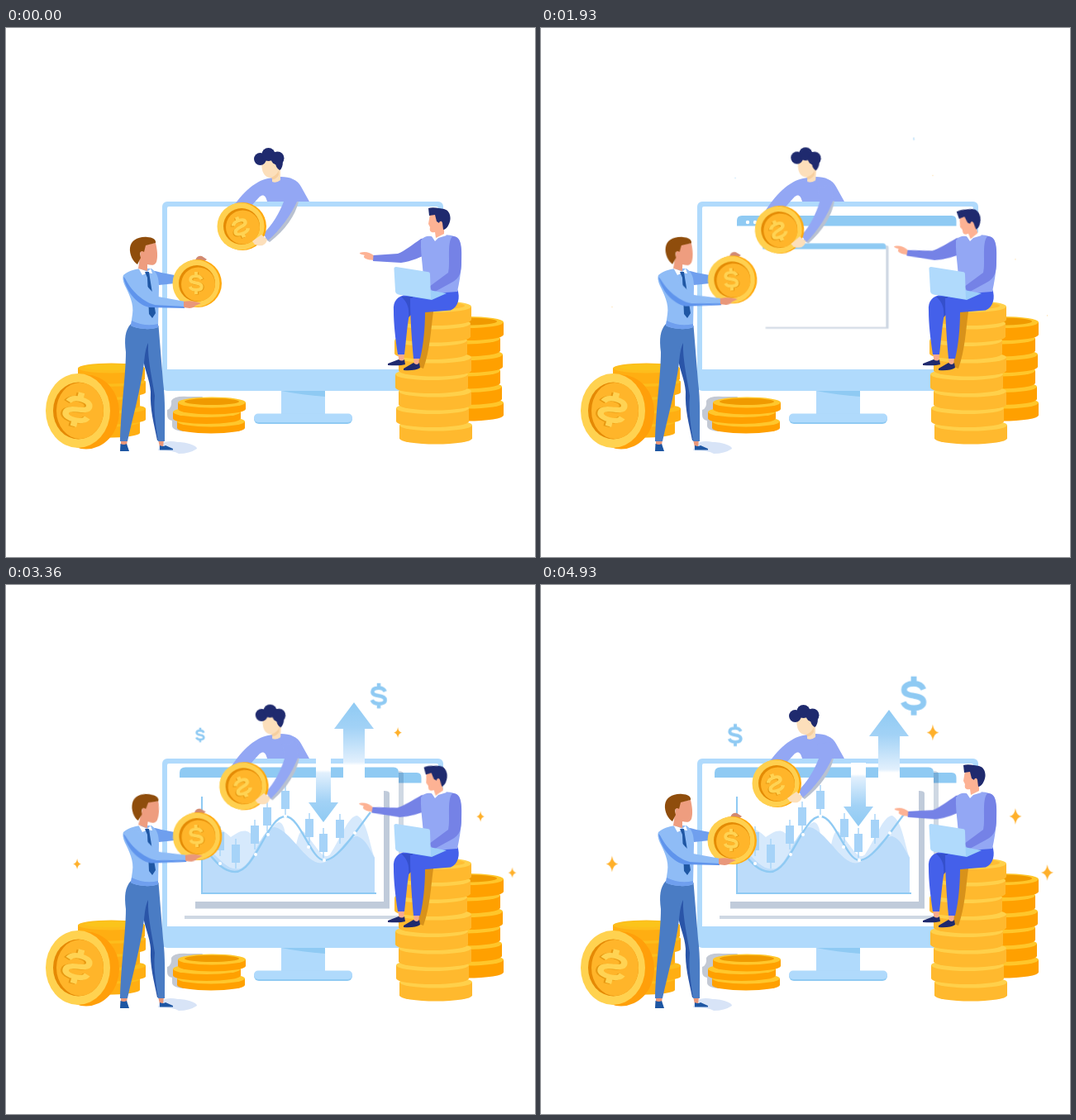
These frames come from a looping animation (640 px wide and 640 px high, 5000 ms). An HTML page:

```html
<!DOCTYPE html>
<html lang="en">
<head>
<meta charset="utf-8">
<title>Investment scene</title>
<style>
html, body { margin: 0; width: 100%; height: 100%; overflow: hidden; background: #fff; }
svg { display: block; width: 100vw; height: 100vh; }
.a { animation: 5s linear infinite; }
.pulse { animation-name: pulse; }
.nod { animation-name: nod; transform-origin: 168px 292px; }
.lift { animation-name: lift; transform-origin: 150px 300px; }
.tilt { animation-name: tilt; transform-origin: 327px 186px; }
.swing { animation-name: swing; transform-origin: 345px 195px; }
.look { animation-name: look; transform-origin: 523px 249px; }
.point { animation-name: point; transform-origin: 510px 262px; }
.win1 { animation-name: win1; transform-origin: 323px 305px; }
.win2 { animation-name: win2; transform-origin: 343px 312px; }
.win3 { animation-name: win3; transform-origin: 343px 318px; }
.up { animation-name: up; transform-origin: 421px 240px; }
.down { animation-name: down; transform-origin: 384px 210px; }
@keyframes pulse {
  0%, 40%, 80% { transform: scale(0); }
  20%, 60%, 99%, 100% { transform: scale(1); }
}
@keyframes nod {
  0%, 48.6%, 98.6%, 100% { transform: rotate(0deg); }
  20% { transform: rotate(8deg); }
  30%, 58.6% { transform: rotate(3deg); }
  75.8% { transform: rotate(9deg); }
}
@keyframes lift {
  0%, 48.6%, 98.6%, 100% { transform: rotate(0deg); }
  20% { transform: rotate(-2.2deg); }
  30%, 75.8% { transform: rotate(-6deg); }
  58.6% { transform: rotate(-1deg); }
}
@keyframes tilt {
  0%, 98.6%, 100% { transform: rotate(0deg); }
  20% { transform: rotate(2deg); }
  30%, 75.8% { transform: rotate(6deg); }
  48.6% { transform: rotate(3deg); }
  58.6% { transform: rotate(1deg); }
}
@keyframes swing {
  0%, 98.6%, 100% { transform: rotate(0deg); }
  20% { transform: rotate(-1.9deg); }
  30%, 75.8% { transform: rotate(-4.9deg); }
  48.6% { transform: rotate(-2.9deg); }
  58.6% { transform: rotate(-1.5deg); }
}
@keyframes look {
  0%, 28%, 73%, 100% { transform: rotate(0deg); }
  30% { transform: rotate(-2deg); }
  41%, 62% { transform: translate(-2px, 1px) rotate(-16deg); }
}
@keyframes point {
  0%, 100% { transform: rotate(0deg); }
  20%, 75.8% { transform: rotate(7deg); }
  30% { transform: rotate(9deg); }
  48.6% { transform: rotate(1.5deg); }
  58.6% { transform: rotate(4deg); }
  98.6% { transform: rotate(1deg); }
}
@keyframes win1 { 0%, 18% { transform: scale(0); } 28%, 100% { transform: scale(1); } }
@keyframes win2 { 0%, 33% { transform: scale(0); } 43%, 100% { transform: scale(1); } }
@keyframes win3 { 0%, 48.7% { transform: scale(0); } 58%, 100% { transform: scale(1); } }
@keyframes up {
  0%, 57.6% { transform: scaleY(0); }
  68%, 75.8% { transform: translateY(0) scaleY(1); }
  98.6%, 100% { transform: translateY(9px) scaleY(1); }
}
@keyframes down {
  0%, 57.6% { transform: scaleY(0); }
  68%, 75.8% { transform: translateY(0) scaleY(1); }
  98.6%, 100% { transform: translateY(5px) scaleY(1); }
}
</style>
</head>
<body>
<svg viewBox="0 0 640 640">
<defs>
  <path id="usd" fill="none" stroke-width="7" d="M12,-8C10,-13 6,-15 0,-15C-7,-15 -12,-12.500 -12,-7.500C-12,-2 -6,-1 0,0C7,1 12,3 12,8C12,13 6,15 0,15C-6,15 -11,13 -13,8M0,-24V-15M0,15V24"/>
  <path id="star" fill="#ffb02a" d="M0,-10Q1.200,-1.200 7.500,0Q1.200,1.200 0,10Q-1.200,1.200 -7.500,0Q-1.200,-1.200 0,-10Z"/>
  <g id="gold">
    <use href="#usd" x="2" y="1" stroke="#e89a12"/>
    <use href="#usd" stroke="#ffd353"/>
  </g>
  <g id="coin">
    <circle cx="1" r="29" fill="#ffa90f"/>
    <circle cx="-1" r="28.500" fill="#ffd04f"/>
    <circle r="22" fill="#e48b05"/>
    <circle cx="1.500" cy="1" r="20.500" fill="#ffb52a"/>
  </g>
  <linearGradient id="upFill" gradientUnits="userSpaceOnUse" x1="0" y1="142" x2="0" y2="218">
    <stop stop-color="#8fcaf3"/><stop offset=".4" stop-color="#a2d2f6"/><stop offset=".95" stop-color="#e2f0fd"/><stop offset="1" stop-color="#fff"/>
  </linearGradient>
  <linearGradient id="downFill" gradientUnits="userSpaceOnUse" x1="0" y1="287" x2="0" y2="224">
    <stop stop-color="#8fcaf3"/><stop offset=".4" stop-color="#a2d2f6"/><stop offset=".95" stop-color="#e2f0fd"/><stop offset="1" stop-color="#fff"/>
  </linearGradient>
</defs>

<!-- monitor -->
<rect x="189" y="210" width="340" height="229" rx="6" fill="#b0dafc"/>
<path fill="#fff" d="M195,218Q195,216 197,216H521Q523,216 523,218V413H195Z"/>
<path fill="#b0dafc" d="M333,438H386V469H333Z"/>
<path fill="#8fcaf3" d="M333,439H386V446Q358,444 333,439Z"/>
<rect x="300" y="467" width="119" height="12" rx="6" fill="#8fcaf3"/>
<rect x="300" y="466.500" width="119" height="10.500" rx="5" fill="#b0dafc"/>

<!-- windows -->
<g class="a win1">
  <path fill="#fff" d="M237,233H502V385H237Z"/>
  <path fill="#8fcaf3" d="M237,239.500V233Q237,227 243,227H497Q502.500,227 502.500,233V239.500Z"/>
  <g fill="#fff"><circle cx="250" cy="235" r="2.200"/><circle cx="259" cy="235" r="2.200"/><circle cx="268" cy="235" r="2.200"/></g>
</g>
<g class="a win2">
  <path fill="#285082" opacity=".22" d="M216,400V404H481V229Q481,225 475,225V400Z"/>
  <path fill="#fff" d="M210,233H475V400H210Z"/>
  <path fill="#8fcaf3" d="M210,233V227Q210,220.500 217,220.500H469Q475,220.500 475,227V233Z"/>
</g>
<g class="a win3">
  <path fill="#c0cbda" d="M229,383V391.500H464V252Q464,249 457,249V383Z"/>
  <path fill="#fff" d="M223,244H457V383H223Z"/>
  <path fill="#d6e9fc" d="M238,303C252,287 262,296 272,305C282,298 292,292 300,306C310,322 319,287 331,287C341,290 338,326 344,326C353,326 351,292 361,299C377,318 384,334 392,326C406,305 414,279 425,279C437,285 440,315 446,330V373H238Z"/>
  <path fill="#bcdcfa" d="M238,318C254,320 264,348 284,343C301,335 309,293 325,293C346,297 364,341 384,336C402,330 410,304 425,304C436,308 440,320 446,330V373H238Z"/>
  <path fill="none" stroke="#8fcaf3" stroke-width="2" d="M237,256V373H448"/>
  <g id="candles" fill="#a6d3f8"></g>
  <path fill="none" stroke="#8fcaf3" stroke-width="2.300" d="M240,318C255,338 265,347 277,347C302,347 316,280 338,280C356,280 369,333 385,333C402,333 425,295 441,275"/>
  <g fill="#fff"><circle cx="259" cy="337" r="2"/><circle cx="302" cy="326" r="2"/><circle cx="317" cy="302" r="2"/><circle cx="338" cy="280" r="2"/><circle cx="366" cy="317" r="2"/><circle cx="385" cy="333" r="2"/><circle cx="422" cy="300" r="2"/></g>
</g>

<path class="a up" fill="url(#upFill)" d="M421,142L445,174H434V240H408V174H397Z"/>
<path class="a down" fill="url(#downFill)" d="M384,287L402,263H393V210H375V263H366Z"/>

<!-- coin piles -->
<path fill="#c3c9d4" d="M195,468V462Q201,460 200,451Q203,445 220,446H238L215,488Q201,487 201,481V475Q195,474 195,468Z"/>
<g id="piles"></g>
<ellipse cx="97" cy="464.500" rx="40" ry="45" fill="#ff9f0a"/>
<ellipse cx="87" cy="463" rx="39" ry="45" fill="#ffd250"/>
<ellipse cx="87.500" cy="463" rx="30.500" ry="34.500" fill="#e58905"/>
<ellipse cx="89.500" cy="463" rx="28.500" ry="34" fill="#ffb52a"/>
<use href="#gold" transform="translate(86.500 461.500) rotate(14) scale(-1.080 .87)"/>

<!-- man behind the monitor -->
<path fill="#93a7f4" d="M271,222C286,198 304,183 320,181.500C337,178 351,181 357,192L367,210H316C314,202 311,201 307,204C300,211 294,219 288,226Z"/>
<g class="a tilt">
  <path fill="#fcdfbb" d="M309,162C315,157 326,158 331,163L332,172L332,184Q327,188 322,186V181C313,182 309,175 309,162Z"/>
  <path fill="#f6cf9f" d="M321,181Q328,178 330,172L330,178Q326,184 322,183Z"/>
  <g fill="#1f2a6e"><circle cx="307.500" cy="158.500" r="7.500"/><circle cx="317.500" cy="153" r="8"/><circle cx="328.500" cy="157.500" r="8"/><path d="M325,160H335Q335,170 331,172Q326,169 325,160Z"/></g>
</g>
<g class="a swing">
  <path fill="#b9c1d0" d="M340,212L354,210C350,227 338,244 319,259L313,255Z"/>
  <path fill="#93a7f4" d="M334,192L336,210C331,223 322,239 311,249L317,257C332,244 345,226 353,208L352,190Z"/>
  <use href="#coin" x="285" y="240"/>
  <use href="#gold" transform="translate(283.500 241) rotate(-20) scale(-.64 .54)"/>
  <path fill="#fcdfbb" d="M309,250L316,256C314,263 309,265 301,262L298,258Z"/>
</g>

<!-- standing man -->
<path fill="#d8e4f7" d="M184,511C185,501 195,498 208,501C220,501 232,506 231,509Q222,515 209,515Q203,511 184,511Z"/>
<path fill="#e9977a" d="M139,498H147L146,505H139ZM184,498H191L190,507H186Z"/>
<path fill="#1d56a3" d="M138.500,503Q143,505 146,503L149,512H138ZM186,505Q190,507 193,505L202,509V510.500H186Z"/>
<path fill="#2a55a8" d="M160,378H180L184,440L186,499H183C179,478 174,462 175,440C174,425 167,412 166,400Z"/>
<path fill="#4a7cc4" d="M151,358C144,366 143,376 145,392C145,420 139,460 138,500H147C153,472 163,438 167,405C168,395 169,387 172,381C171,400 177,425 180,445C178,465 182,485 184,500H192C192,475 193,450 190,428L184.500,360Z"/>
<path fill="#6f9fee" d="M174,293Q182,294 188,296L204,299V309L185,311Z"/>
<path fill="#8fbcf6" d="M142,299C148,294 155,292 162,291H176C183,296 185,302 185,314L184,362C174,366 159,364 151,360L153,346C155,334 149,322 144,312Q140,303 142,299Z"/>
<path fill="#6f9fee" d="M151,360L152,354Q168,362 184,358V362C174,366 159,364 151,360Z"/>
<path fill="#fff" d="M160,290L171,295L175,291L177,297L171,296L165,299Z"/>
<path fill="#1f57a4" d="M168,295H173L174,302L181,345L177,351L173,346L171,302Z"/>
<g class="a nod">
  <path fill="#ee9d7f" d="M165,263L181,260C183,268 184,277 182,283C180,288 175,287 171,286V294L160,291L163,270Z"/>
  <path fill="#8f4d0c" d="M150,266C151,257 160,252 171,253C177,253 182,256 181,260L169,263L167,271C163,268 161,272 163,278L159,286C154,283 149,274 150,266Z"/>
</g>
<g class="a lift">
  <path fill="#d18a72" d="M229,281Q231,275 237,276L243,280L238,284Z"/>
  <use href="#coin" x="231" y="309"/>
  <use href="#gold" transform="translate(230 308.500) scale(.56)"/>
  <path fill="#5f94ec" d="M142,301C145,317 157,334 173,338L216,339V335L180,333Z"/>
  <path fill="#8fbcf6" d="M143,300C148,314 164,331 180,335L217,337V331L184,325C175,318 166,308 160,297Z"/>
  <path fill="#e9977a" d="M215,331C222,329 231,331 236,333L229,336C226,340 220,339 215,338Z"/>
</g>

<!-- sitting man -->
<path fill="#d8921a" d="M506,343H517C514,365 513,390 505,412L494,408Z"/>
<path fill="#f9ab8c" d="M474,394H482L481,404H476ZM493,399H500L499,409H494Z"/>
<path fill="#1f2a6e" d="M462,406L475,401Q479,404 482,401L483,407Q477,409 462,408ZM481,412L493,405Q497,409 500,405L501,411Q495,415 481,414Z"/>
<path fill="#4460ea" d="M469,342C468,330 474,324 484,323L505,325L488,346C485,362 484,380 482,395H474C471,375 469,358 469,342Z"/>
<path fill="#3550cc" d="M478,325L492,325L490,347L487,350Q489,334 478,325Z"/>
<path fill="#4460ea" d="M489,327L546,316C550,326 547,338 538,341.500L507,344C507,362 505,384 501,400H493C491,378 489,352 489,327Z"/>
<g class="a point">
  <path fill="#fdb294" d="M446,276C440,271 434,270 428,272C427,274 433,274 434,275C430,278 438,281 446,281Z"/>
  <path fill="#7582e6" d="M514,253L502,255C492,262 482,270 474,273L444.500,275L444,282L478,284C490,283 503,276 514,272Z"/>
</g>
<path fill="#93a7f4" d="M502,257C506,251 515,250 520,255L531,250C541,251 547,252 549,258C553,275 551,297 546,319L505,322C507,300 501,275 502,257Z"/>
<path fill="#fff" d="M515,252L530,247L533,251L523,254L519,258Z"/>
<g class="a look">
  <path fill="#fdb294" d="M513,225H522L530,234V249L520,254L519,247C514,248 512,246 513,241L511,237Z"/>
  <path fill="#1f2a6e" d="M511,218C516,216 525,218 530,219C538,221 539,231 536,237Q533,244 529,244L528,236C527,232 524,234 524,236L521,234L519,226L512,227Z"/>
</g>
<path fill="#7582e6" d="M540,252C550,252 552,262 551,282C551,296 549,303 539,308L517,320L512,313L535,296C538,285 533,260 540,252Z"/>
<path fill="#9dcff9" d="M473,322L512,317L533,321L515,329Z"/>
<path fill="#b0dafc" d="M472,289L510,295Q513,295 513,298L514,328L474,322Q471,321 471,318L469.500,292Q469,289 472,289Z"/>

<!-- floating marks -->
<g stroke="#8fcaf3">
  <g transform="translate(451 134)"><use class="a pulse" href="#usd"/></g>
  <g transform="translate(235 181.500) scale(.57)"><use class="a pulse" href="#usd"/></g>
</g>
<g transform="translate(474 178.500)"><use class="a pulse" href="#star"/></g>
<g transform="translate(86 337.500)"><use class="a pulse" href="#star"/></g>
<g transform="translate(574 280)"><use class="a pulse" href="#star"/></g>
<g transform="translate(612.500 348)"><use class="a pulse" href="#star"/></g>
</svg>
<script>
const $ = id => document.getElementById(id);

// Stack of discs, drawn from the bottom up; shifts move each disc sideways.
function pile({ x, y, w, ry, h, step, side, rim, top, shifts }) {
  const rx = w / 2;
  let out = '';
  for (let i = shifts.length - 1; i >= 0; i--) {
    const l = x + shifts[i], cy = y + i * step;
    out += `<path fill="${side}" d="M${l},${cy}V${cy + h}A${rx},${ry} 0 0 0 ${l + w},${cy + h}V${cy}Z"/>` +
      `<ellipse cx="${l + rx}" cy="${cy}" rx="${rx}" ry="${ry}" fill="${rim}"/>`;
  }
  const cx = x + shifts[0] + rx;
  return out + `<ellipse cx="${cx}" cy="${y - 1}" rx="${rx - 8}" ry="${ry - 2.5}" fill="${top}"/>`;
}

$('piles').innerHTML = [
  { x: 87, y: 411.5, w: 81, ry: 6, h: 13, step: 16.3, side: '#ffae12', rim: '#fdbd1c', top: '#fbc41b', shifts: [0, 1, -6, 1, -6] },
  { x: 208, y: 453, w: 82, ry: 6.5, h: 8, step: 11.5, side: '#ffa000', rim: '#ffc72c', top: '#f09a00', shifts: [0, -6, -1] },
  { x: 514, y: 356, w: 88, ry: 7, h: 15, step: 19.5, side: '#ffa000', rim: '#ffc62a', top: '#f09a00', shifts: [0, -4, -1, -4, -2, 0] },
  { x: 475, y: 337, w: 88, ry: 7, h: 16, step: 20.5, side: '#ffb92e', rim: '#ffd04a', top: '#ffbe33', shifts: [0, -1, -5, 0, -4, 0, -3, 1] }
].map(pile).join('');

const candles = [[259, 299], [278, 314], [301, 291], [316, 269], [338, 249], [367, 283], [384, 301], [404, 284]];
$('candles').innerHTML = candles.map(([x, y]) =>
  `<path d="M${x - 5},${y}h10v22h-10zM${x - .7},${y - 7}h1.4v36h-1.4z"/>`).join('');
</script>
</body>
</html>
```
